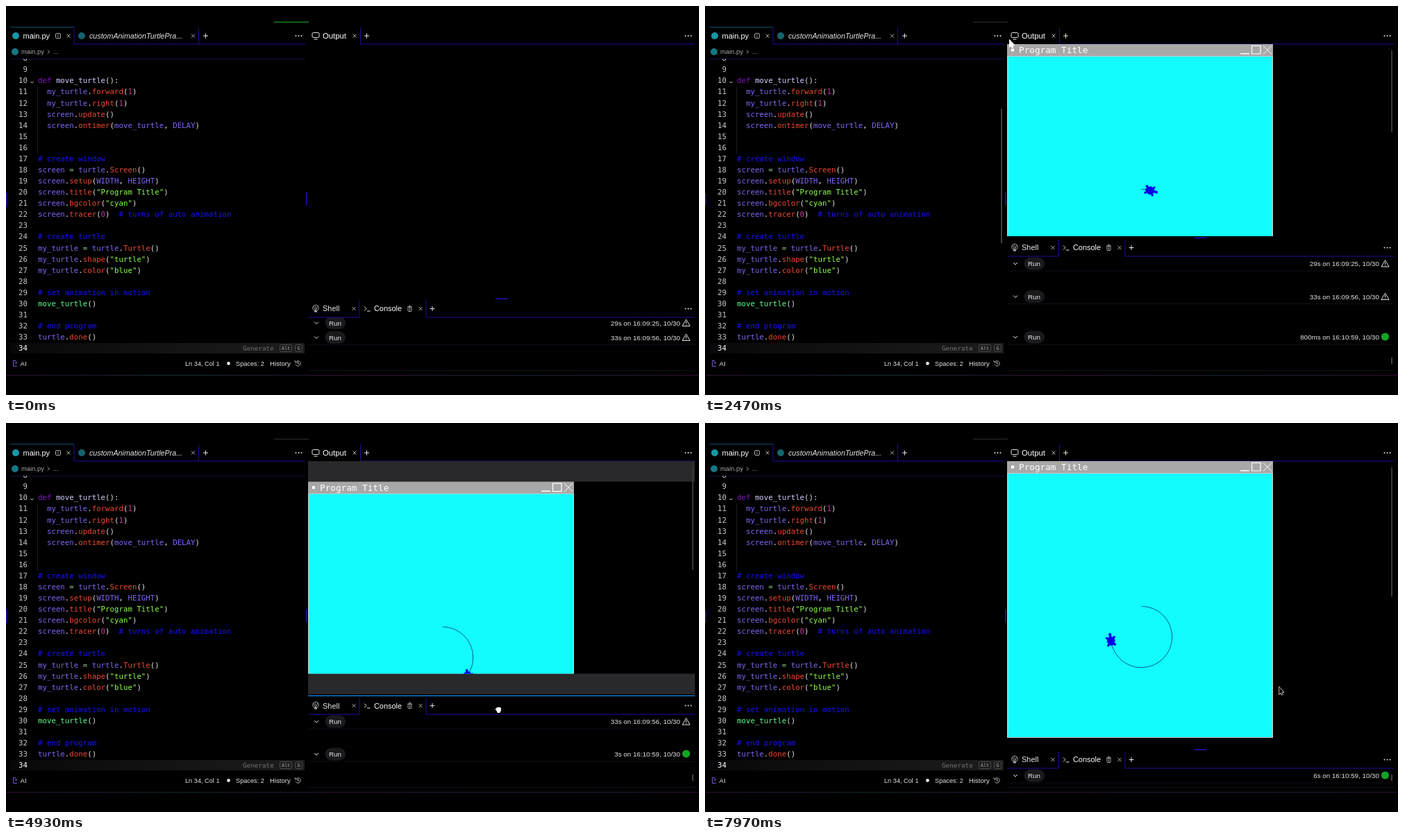
Recreate the animation shown at these times as an HTML page with a canvas. Size 998x561 px, loop 8000 ms.

```html
<!DOCTYPE html>
<html lang="en">
<head>
<meta charset="utf-8">
<title>Turtle animation in a code editor</title>
<style>
  html, body { margin: 0; width: 100%; height: 100%; overflow: hidden; background: #000; }
  canvas { display: block; }
</style>
</head>
<body>
<canvas id="stage" width="998" height="561"></canvas>
<script>
const ctx = document.getElementById('stage').getContext('2d');
const SANS = '"Liberation Sans", Arial, sans-serif';
const MONO = '"DejaVu Sans Mono", monospace';
const CODE_SIZE = 10.76;
const LOOP = 8, RUN_START = 1.671, WINDOW_OPEN = 2.07, TURTLE_START = 2.138;
const DRAG_START = 4.4, DRAG_END = 5.95, RESIZED = 6.5;
const BORDER = '#1c0e9c', HANDLE = '#2212bc', LIGHT = '#e4e4e6', DIM = '#a8a8ac';
const PANEL = { left: 435, top: 55, right: 992 };
const VIEW_HEIGHT = 277;

const code = {
  10: 'def move_turtle():',
  11: '  my_turtle.forward(1)',
  12: '  my_turtle.right(1)',
  13: '  screen.update()',
  14: '  screen.ontimer(move_turtle, DELAY)',
  17: '# create window',
  18: 'screen = turtle.Screen()',
  19: 'screen.setup(WIDTH, HEIGHT)',
  20: 'screen.title("Program Title")',
  21: 'screen.bgcolor("cyan")',
  22: 'screen.tracer(0)  # turns of auto animation',
  24: '# create turtle',
  25: 'my_turtle = turtle.Turtle()',
  26: 'my_turtle.shape("turtle")',
  27: 'my_turtle.color("blue")',
  29: '# set animation in motion',
  30: 'move_turtle()',
  32: '# end program',
  33: 'turtle.done()'
};

// Piecewise linear motion through [time, ...values] keys.
function track(t, keys) {
  const next = keys.findIndex(k => k[0] > t);
  if (next === 0) return keys[0].slice(1);
  if (next < 0) return keys[keys.length - 1].slice(1);
  const a = keys[next - 1], b = keys[next];
  const p = (t - a[0]) / (b[0] - a[0]);
  return a.slice(1).map((v, i) => v + (b[i + 1] - v) * p);
}

function text(str, x, y, size, color = LIGHT, align = 'left', font = SANS, style = '') {
  ctx.font = `${style} ${size}px ${font}`;
  ctx.textAlign = align;
  ctx.fillStyle = color;
  ctx.fillText(str, x, y + size * 0.36);
}

function rect(x, y, w, h, color) {
  ctx.fillStyle = color;
  ctx.fillRect(x, y, w, h);
}

function stroke(points, color, width = 1, close = false) {
  ctx.beginPath();
  points.forEach(([x, y]) => ctx.lineTo(x, y));
  if (close) ctx.closePath();
  ctx.strokeStyle = color;
  ctx.lineWidth = width;
  ctx.stroke();
}

function disc(x, y, r, color) {
  ctx.beginPath();
  ctx.arc(x, y, r, 0, 7);
  ctx.fillStyle = color;
  ctx.fill();
}

function ring(x, y, r, color, from = 0, to = 7, width = 1) {
  ctx.beginPath();
  ctx.arc(x, y, r, from, to);
  ctx.strokeStyle = color;
  ctx.lineWidth = width;
  ctx.stroke();
}

function pill(x, y, w, h, r, fill, line) {
  ctx.beginPath();
  ctx.roundRect(x, y, w, h, r);
  if (fill) { ctx.fillStyle = fill; ctx.fill(); }
  if (line) { ctx.strokeStyle = line; ctx.lineWidth = 1; ctx.stroke(); }
}

function clipTo(x, y, w, h, draw) {
  ctx.save();
  ctx.beginPath();
  ctx.rect(x, y, w, h);
  ctx.clip();
  draw();
  ctx.restore();
}

function cross(x, y, r = 2.5, color = DIM) {
  stroke([[x - r, y - r], [x + r, y + r]], color);
  stroke([[x - r, y + r], [x + r, y - r]], color);
}

function plus(x, y) {
  stroke([[x - 3.5, y], [x + 3.5, y]], LIGHT);
  stroke([[x, y - 3.5], [x, y + 3.5]], LIGHT);
}

function dots(x, y) {
  for (const dx of [-4, 0, 4]) disc(x + dx, y, 1, LIGHT);
}

function chevron(x, y, r = 3) {
  stroke([[x - r, y - r / 2], [x, y + r / 2], [x + r, y - r / 2]], LIGHT);
}

function drawCode() {
  const lineY = n => 107.5 + (n - 10) * 16.08;
  const glow = ctx.createLinearGradient(6, 0, 430, 0);
  glow.addColorStop(0, '#08080a');
  glow.addColorStop(1, '#1d1d1c');
  rect(6, 486, 424, 15, glow);

  clipTo(0, 76, 431, 430, () => {
    for (let n = 8; n <= 34; n++)
      text(n, 31, lineY(n), CODE_SIZE, n === 34 ? '#fff' : '#c8c8ca', 'right', MONO);
  });
  chevron(37.5, 110, 2);
  rect(45, 116, 1, 97, '#1c1c1f');

  ctx.font = `${CODE_SIZE}px ${MONO}`;
  const advance = ctx.measureText('0').width;
  for (const [n, line] of Object.entries(code)) {
    for (const m of line.matchAll(/#.*|"[^"]*"|\d+|\w+|[^\s\w]/g)) {
      const [token] = m, before = line[m.index - 1], after = line[m.index + token.length];
      let color = '#e0e0e4';
      if (token[0] === '#') color = '#1810ff';
      else if (token[0] === '"') color = '#8cff4c';
      else if (token === '=') color = '#8fcf8f';
      else if (/^\d/.test(token)) color = '#c83a9c';
      else if (token === 'def') color = '#8214c0';
      else if (/\w/.test(token)) {
        color = '#8264f0';
        if (before === '.') color = '#ee4830';
        else if (after === '(') color = before ? '#d6c8ff' : '#5cff8c';
      }
      text(token, 46 + m.index * advance, lineY(+n), CODE_SIZE, color, 'left', MONO);
    }
  }
  text('Generate', 341, 493.5, 9.3, '#727274', 'left', MONO);
  pill(394.5, 488.5, 17, 10, 2, null, '#4a4a4c');
  text('Alt', 403, 493.5, 7, '#aaa', 'center', MONO);
  pill(416.5, 488.5, 10, 10, 2, null, '#4a4a4c');
  text('G', 421.5, 493.5, 7, '#aaa', 'center', MONO);
}

function drawEditor(t) {
  rect(6, 30, 92, 1, '#0a4a66');
  rect(97.5, 31, 1, 24, BORDER);
  rect(277, 31, 1, 24, BORDER);
  rect(98, 54.5, 333, 1, BORDER);
  disc(14, 43, 5, '#1797a5');
  text('main.py', 24.5, 43, 11, '#fff');
  pill(71.5, 39.5, 7, 7, 1.5, null, DIM);
  text('c', 75, 42.7, 6.5, DIM, 'center');
  cross(90, 43);
  disc(109, 43, 5, '#12656e');
  text('customAnimationTurtlePra...', 120, 43, 10.7, LIGHT, 'left', SANS, 'italic');
  cross(269.5, 43);
  plus(287.5, 43);
  dots(421.5, 43);

  disc(13, 66, 5, '#147884');
  text('main.py', 22, 66, 9.4, DIM);
  stroke([[60, 63.5], [62.5, 66], [60, 68.5]], DIM);
  text('...', 68, 66, 9.4, DIM);
  rect(6, 76, 425, 1, '#10103c');
  drawCode();

  stroke([[14, 511.5], [10.5, 511.5], [10.5, 519.5], [16, 519.5]], '#7a55d8');
  text('+', 14.5, 514.5, 8, '#a478f0', 'center');
  text('AI', 20.5, 515.5, 9.6);
  text('Ln 34, Col 1', 258, 515.5, 9.2);
  disc(320.5, 515.5, 2.4, LIGHT);
  text('Spaces: 2', 331, 515.5, 9.2);
  text('History', 380, 515.5, 9.6);
  ring(420.5, 515.5, 3.7, DIM, -2.5, 2.8);
  stroke([[416, 511], [416.5, 514], [419.5, 514]], DIM);
  stroke([[420.5, 513], [420.5, 516], [422.5, 516]], DIM);

  rect(0, 270, 1.5, 18, HANDLE);
  rect(432, 269, 1.5, 18, HANDLE);
  if (t > 0.8 && t < 3.5) {
    ctx.globalAlpha = track(t, [[2.4, 1], [3.5, 0]])[0];
    rect(426, 148, 2, 194, '#444446');
    ctx.globalAlpha = 1;
  }
}

function drawTurtle(x, y, heading) {
  const half = [[0, 16], [2, 14], [1, 10], [4, 7], [7, 9], [9, 8], [6, 5], [7, 1],
    [5, -3], [8, -6], [6, -8], [4, -5], [0, -7]];
  const outline = [...half, ...half.map(([a, b]) => [-a, b]).reverse()];
  ctx.save();
  ctx.translate(x, y);
  ctx.rotate(heading);
  ctx.scale(0.77, 0.77);
  ctx.beginPath();
  outline.forEach(([side, ahead]) => ctx.lineTo(ahead, side));
  ctx.closePath();
  ctx.fillStyle = ctx.strokeStyle = '#0000e6';
  ctx.lineWidth = 1.6;
  ctx.lineJoin = 'round';
  ctx.fill();
  ctx.stroke();
  ctx.restore();
}

function drawWindow(t) {
  if (t < WINDOW_OPEN) {
    rect(435, 55, 18, 16, '#a8a8a8');
    rect(435, 71, 18, 18, '#dcdcdc');
    rect(441, 61, 4, 4, '#fff');
    return;
  }
  rect(435, 55, 383, 399, '#c4ccc4');
  rect(435, 55, 383, 17, '#a8a8a8');
  rect(441, 61.5, 4, 4, '#fff');
  text('Program Title', 452, 63.5, 12.7, '#fff', 'left', MONO);
  rect(771, 68, 13, 1.5, '#fff');
  stroke([[787.5, 57.5], [800, 57.5], [800, 69], [787.5, 69]], '#fff', 1.2, true);
  cross(810, 63.5, 6, '#fff');
  rect(436.5, 73, 380.3, 380, '#12fcfe');

  const turn = Math.max(0, t - TURTLE_START) * 44.75 * Math.PI / 180;
  const x = 628.5, y = 308.5, r = 44.2;
  ring(x, y, r, '#003080', -Math.PI / 2, turn - Math.PI / 2, 0.8);
  drawTurtle(x + r * Math.sin(turn), y - r * Math.cos(turn), turn);
}

function drawOutput(t, divider) {
  rect(510, 31, 1, 24, BORDER);
  rect(510, 54.5, 482, 1, BORDER);
  pill(441, 38.5, 10, 7, 1.5, null, LIGHT);
  stroke([[443.5, 48], [448.5, 48]], LIGHT);
  text('Output', 456, 43, 11.3, '#fff');
  cross(502, 43);
  plus(519.5, 43);
  dots(982.5, 43);
  if (t < 1.95) return;

  const { left, top, right } = PANEL, height = divider - 2 - top;
  const dragging = t >= DRAG_START && t < DRAG_END;
  const shift = dragging ? (height - VIEW_HEIGHT) / 2 : 0;
  const viewHeight = t < RESIZED ? VIEW_HEIGHT : 400;
  if (t >= DRAG_START && t < RESIZED) {
    rect(left, top, right - left, height, '#29292b');
    rect(left, top + shift, right - left, viewHeight, '#000');
  }
  clipTo(left, top + shift, right - left, viewHeight, () => {
    ctx.translate(0, shift);
    drawWindow(t);
  });
  rect(988, 64, 2, t < 2.3 ? 188 : 118 + (height - VIEW_HEIGHT) / 2, '#363836');
}

function drawRow(y, label, ok) {
  rect(435, y - 11, 557, 21, '#000');
  rect(435, y + 10, 557, 1, '#0f0f1c');
  chevron(447, y);
  pill(459.5, y - 9, 29.5, 18, 9, '#1a1a1c');
  text('Run', 474, y, 9.8, LIGHT, 'center');
  text(label, 971, y, 9.8, LIGHT, 'right');
  if (ok) disc(979.5, y - 0.5, 5.6, '#12a424');
  else {
    stroke([[979.5, y - 5], [985, y + 4.5], [974, y + 4.5]], LIGHT, 1, true);
    rect(979, y - 2, 1, 3, LIGHT);
    rect(979, y + 2, 1, 1, LIGHT);
  }
}

function drawConsole(t, divider) {
  const running = t >= RUN_START;
  const rows = [
    { y: 371, label: '29s on 16:09:25, 10/30' },
    { y: 419, label: '33s on 16:09:56, 10/30' }
  ];
  if (running) {
    const spent = t - RUN_START;
    const clock = spent < 1 ? `${Math.round(spent * 1000)}ms` : `${Math.floor(spent)}s`;
    rows.push({ y: 477.5, label: `${clock} on 16:10:59, 10/30`, ok: true });
  } else {
    rows[0].y = 419;
    rows[1].y = 478;
  }

  // Headers stick below the tabs until the next one pushes them away.
  clipTo(435, divider + 27, 557, 527 - divider - 27, () => {
    rows.forEach((row, i) => {
      const next = rows[i + 1];
      const stuck = Math.max(row.y, divider + 37.5);
      const y = next ? Math.min(stuck, next.y - 21) : stuck;
      drawRow(y, row.label, row.ok);
      if (next) rect(435, next.y - 11, 557, 1, '#0f0f1c');
    });
    rect(435, 525, 557, 1, '#12121c');
  });
  if (running) rect(988, 507, 2, 9, '#444446');

  const y = divider + 14.5;
  rect(508.5, divider + 3, 1, 24, BORDER);
  rect(604.5, divider + 3, 1, 24, BORDER);
  rect(435, divider + 26.5, 74, 1, BORDER);
  rect(605, divider + 26.5, 387, 1, BORDER);
  ring(446, y - 1, 4.3, DIM);
  for (const dx of [-3, 0, 3]) stroke([[446, y + 4], [446 + dx, y - 4]], DIM, 0.8);
  rect(444, y + 3, 4, 2, DIM);
  text('Shell', 456, y, 11);
  cross(501, y);
  stroke([[516, y - 3], [519, y], [516, y + 3]], LIGHT);
  stroke([[520, y + 3.5], [524.5, y + 3.5]], LIGHT);
  text('Console', 530, y, 10.9, '#fff');
  stroke([[578, y - 2.5], [585, y - 2.5]], DIM);
  pill(579, y - 2, 5, 6, 1, null, DIM);
  stroke([[580, y - 4], [583, y - 4]], DIM);
  rect(581, y - 1, 1, 4, DIM);
  cross(597, y);
  plus(614, y);
  dots(982.5, y);

  if (t >= DRAG_START && t < DRAG_END)
    rect(435, divider - 0.5, 557, 1.5, t < 5.2 ? '#157cd4' : '#eef4fa');
  else
    rect(705, divider - 0.5, 18, 1.5, t >= DRAG_END && t < 6.6 ? '#fff' : HANDLE);
}

function drawCursor(t) {
  if (t < 0.8) return;
  const [x, y] = track(t, [[2.4, 415, 23], [3.2, 704, 373], [3.6, 704, 373], [4.3, 706, 334],
    [4.4, 706, 336], [4.93, 709, 413], [5.4, 706, 471], [6.6, 706, 471], [7.4, 829, 386]]);
  ctx.save();
  ctx.translate(x, y);
  if (t < 2.45) {
    pill(-3, -1, 7, 6, 2, '#fff');
    pill(-2, -5, 2, 7, 1, '#fff');
    stroke([[-5, 0], [-2, 3]], '#fff', 2);
  } else if (t >= 4.45 && t < 5.2) {
    pill(-3, -3, 7, 6, 2, '#fff');
    pill(-2, 0, 5, 5, 1.5, '#fff');
    stroke([[-4, -1], [-1, 2]], '#fff', 1.5);
  } else if (t >= 4.2 && t < 6.6) {
    for (const side of [-1, 1]) {
      stroke([[-5, side * 1.2], [5, side * 1.2]], '#fff');
      stroke([[0, side * 2], [0, side * 6]], '#fff');
      stroke([[-2, side * 4], [0, side * 6], [2, side * 4]], '#fff');
    }
  } else {
    const arrow = [[-2, -5], [-2, 5], [0, 3], [1.5, 6], [3, 5.3], [1.7, 2.5], [4.5, 2]];
    stroke(arrow, '#fff', 1.2, true);
    ctx.fillStyle = t < 5 ? '#fff' : '#111';
    ctx.fill();
  }
  ctx.restore();
}

function draw(t) {
  rect(0, 0, 998, 561, '#000');
  const bar = t < 0.9 ? '#177a20' : t < 2.45 ? '#4a4a4c' : '#222224';
  rect(386, 22.5, 50, 1.5, bar);

  const divider = t < RUN_START ? 422
    : track(t, [[DRAG_START, 334], [4.93, 393], [5.5, 463], [5.6, 471]])[0];
  drawEditor(t);
  drawConsole(t, divider);
  drawOutput(t, divider);

  const edge = ctx.createLinearGradient(0, 0, 998, 0);
  ['#301038', '#102c30', '#34103c', '#182438', '#301038']
    .forEach((color, i) => edge.addColorStop(i / 4, color));
  rect(0, 532, 998, 1, edge);
  drawCursor(t);
}

const start = performance.now();
function frame() {
  draw((performance.now() - start) / 1000 % LOOP);
  requestAnimationFrame(frame);
}
frame();
</script>
</body>
</html>
```
